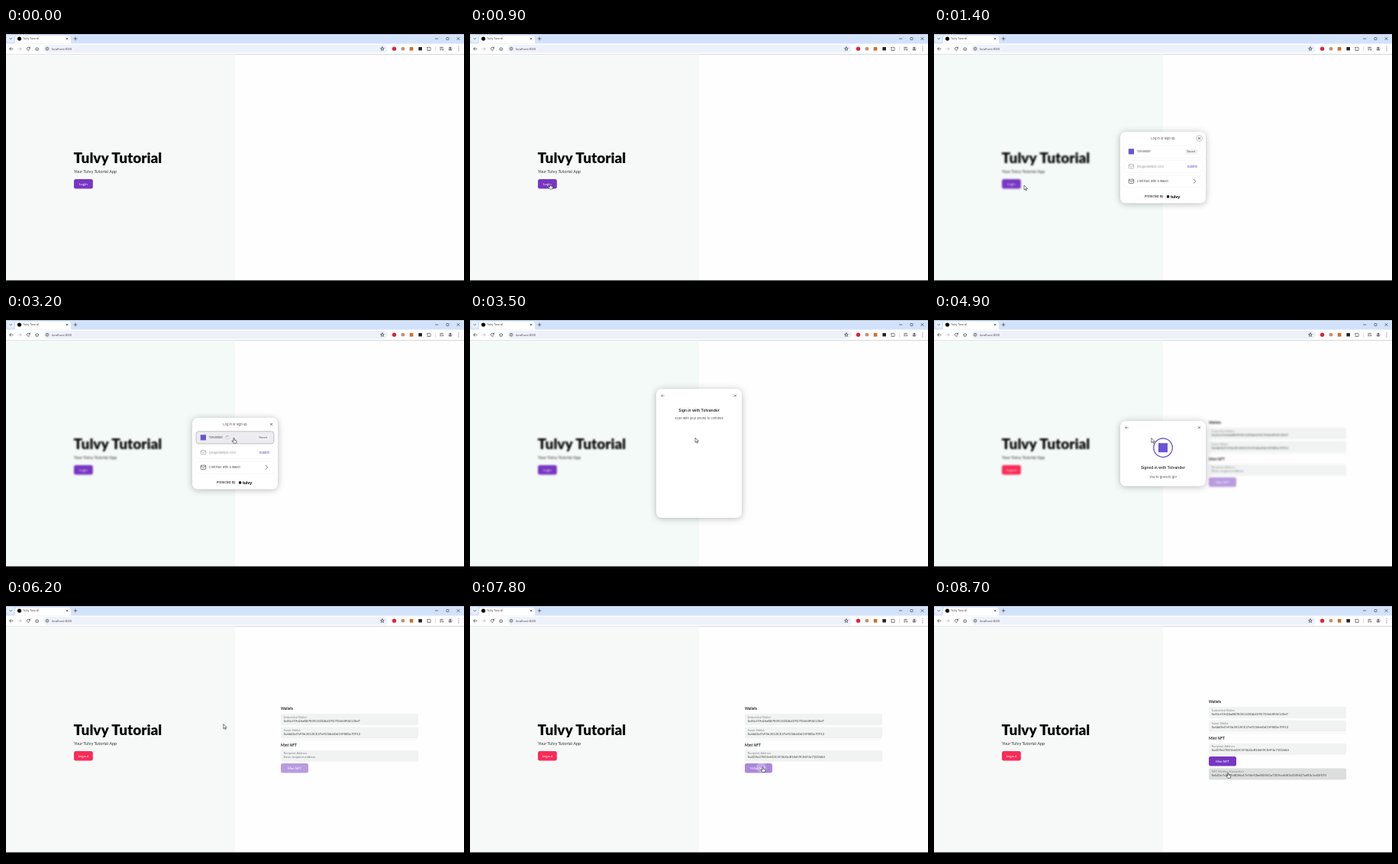
Write an HTML page that moves like this. It is 600x338 px and loops after 8.9 s.

```html
<!DOCTYPE html>
<html lang="en">
<head>
<meta charset="utf-8">
<title>Tulvy Tutorial</title>
<style>
  html, body { margin: 0; width: 100%; height: 100%; overflow: hidden; background: #000; }
  svg { display: block; width: 100vw; height: 100vh; }
  text { white-space: pre; }
  .lato { font-family: Lato, sans-serif; }
  .inter { font-family: Inter, sans-serif; }
  .ui { font-family: "Open Sans", sans-serif; }
  .line { fill: none; stroke: #3c4043; stroke-width: .7; stroke-linecap: round; stroke-linejoin: round; }
  .shadow { filter: drop-shadow(0 1px 4px rgba(20, 25, 40, .3)); }
</style>
</head>
<body>
<svg id="stage" viewBox="0 0 600 338"></svg>
<script>
const LOOP = 8900;
const PURPLE = '#7736c3', VIOLET = '#6b54d2', INK = '#101014';

// ---- drawing helpers ----
const text = (x, y, size, str, { font = 'lato', fill = INK, weight = 400, anchor = 'start', id = '' } = {}) =>
  `<text ${id && `id="${id}"`} class="${font}" x="${x}" y="${y}" font-size="${size}" fill="${fill}" font-weight="${weight}" text-anchor="${anchor}">${str}</text>`;
const rect = (x, y, w, h, r, fill, extra = '') =>
  `<rect x="${x}" y="${y}" width="${w}" height="${h}" rx="${r}" fill="${fill}" ${extra}/>`;
const dot = (x, y, r, fill, extra = '') => `<circle cx="${x}" cy="${y}" r="${r}" fill="${fill}" ${extra}/>`;
const line = (d, extra = '') => `<path class="line" d="${d}" ${extra}/>`;
const group = (id, body, extra = '') => `<g id="${id}" ${extra}>${body}</g>`;
const cross = (x, y, s) => line(`M${x - s} ${y - s}l${2 * s} ${2 * s}m0 ${-2 * s}l${-2 * s} ${2 * s}`);
const spinner = (id, x, y, r, color, width, base) =>
  dot(x, y, r, 'none', `stroke="${base}" stroke-width="${width}"`) +
  `<circle id="${id}" data-c="${x} ${y}" cx="${x}" cy="${y}" r="${r}" fill="none" stroke="${color}" stroke-width="${width}" pathLength="100"/>`;

// ---- browser frame ----
function browser() {
  const dots = [24.7, 27.2, 29.7].map(y => dot(593, y, .55, '#3c4043')).join('');
  return rect(0, 8, 600, 13, 0, '#d3e2fb') +
    rect(1.5, 9.5, 9, 9, 2.5, '#e7effd') + line('M4.8 13.4l1.4 1.4 1.4-1.4') +
    '<path d="M10 20.5q2 0 2-2v-6q0-2.5 2.5-2.5h68q2.5 0 2.5 2.5v6q0 2 2 2z" fill="#fff"/>' +
    dot(17.5, 14, 2.6, '#000') + text(22.3, 15.3, 3.4, 'Tulvy Tutorial', { font: 'ui', fill: '#333' }) +
    cross(80, 14, 1) + line('M89 14h4m-2-2v4') +
    line('M562.5 14h3.4') + rect(577, 12.5, 3, 3, .4, 'none', 'stroke="#333" stroke-width=".6"') + cross(592.5, 14, 1.6) +
    rect(0, 20.5, 600, 14, 0, '#fff') + rect(49, 22, 451, 10.4, 5.2, '#edf1f9') +
    line('M9 27.3H4.8m1.9-2l-2 2 2 2') + line('M15.8 27.3H20m-1.9-2l2 2-2 2', 'opacity=".35"') +
    line('M31 26a2 2 0 1 0 .2 2M31.4 24.9v1.5h-1.5') + line('M38.7 27.2l2-1.9 2 1.9m-3.4-.4v2.4h2.8v-2.4') +
    dot(54, 27.2, 2, 'none', 'stroke="#3c4043" stroke-width=".6"') + line('M54 27v1.2m0-2.2v.1') +
    text(59.8, 28.7, 3.9, 'localhost:3000', { font: 'ui', fill: '#444' }) +
    line('M493 24.8l.7 1.6 1.7.1-1.3 1.1.4 1.7-1.5-.9-1.5.9.4-1.7-1.3-1.1 1.7-.1z') +
    dot(508.6, 27.2, 2.6, '#dc2238') + dot(520, 27.2, 2.4, '#bd917b') + rect(528.8, 25, 4.6, 4.6, 0, '#d56c29') +
    rect(540.4, 25, 4.6, 4.4, 0, '#252528') +
    line('M552 25.6h1.3q.7-1.5 1.4 0h1.3v1.2q1.4.7 0 1.4v1.2h-4v-1.2q1-.7 0-1.4z') +
    line('M562.8 24.5v5.5', 'opacity=".3"') + line('M568.7 25.4h4m-4 1.7h2m-2 1.7h1.4m2-1v1.4m0-1.4h1') +
    dot(582, 27.2, 2.9, '#d2d3d8') + dot(582, 26.2, 1.1, '#5a5b63') + '<path d="M579.8 29a2.3 1.9 0 0 1 4.4 0z" fill="#5a5b63"/>' +
    dots + rect(0, 34.2, 600, .6, 0, '#e6e9ee') +
    rect(0, 0, 600, 8, 0, '#000') + rect(0, 330.6, 600, 8, 0, '#000');
}

// ---- page ----
const button = (x, y, w, fill, label, size, id) =>
  group(id, rect(x, y, w, 12.4, 2.5, fill, 'class="face"') +
    text(x + w / 2, y + 7.8, size, label, { fill: '#fff', anchor: 'middle' }));
const field = (y, label, value, id, fill = '#f1f2f2') =>
  rect(360, y, 180, 15, 2, fill) + text(363.7, y + 5.7, 3.9, label, { fill: '#8a8a8c' }) +
  text(363.7, y + 10.7, 4.15, value, { fill: '#444', id });

const RECIPIENT = '0x4D9a27E81b603C5f7A42eB18d59C06F3a71D2b84';

function page() {
  const dashboard =
    text(360, 144, 4.9, 'Wallets', { weight: 600 }) +
    field(149, 'Embedded Wallet', '0x83cf19d24aBB7E05C6DDA41f92703b58F6E120d7') +
    field(166.4, 'Smart Wallet', '0x6A40d7e95b3812fCE27a9C04b6Dd15F8B3e70912') +
    rect(360, 183.6, 180, .4, 0, '#e7e8e8') +
    text(360, 191.8, 4.9, 'Mint NFT', { weight: 600 }) +
    field(196.7, 'Recipient Address', '', 'recipient') +
    button(360, 214, 36, PURPLE, 'Mint NFT', 4.3, 'mint') +
    group('minting', spinner('mintSpin', 367, 221.2, 1.5, '#fff', .5, 'none') + dot(381.5, 219.5, 6.5, '#fff', 'opacity=".28"')) +
    group('receipt', field(229.6, 'NFT Minting Transaction',
      '0xb41e7c9025d83f6a17c04e92bd58f361a7209ce4d81b35f0627ad94c1e83f570', '', '#dcdede'));
  return rect(0, 34.5, 600, 297, 0, '#fefefe') + rect(0, 34.5, 300, 297, 0, '#f7f9f9', 'id="panel"') +
    group('content',
      text(88.6, 176.6, 19, 'Tulvy Tutorial', { weight: 900, fill: '#060606' }) +
      text(89, 190.2, 5.6, 'Your Tulvy Tutorial App', { fill: '#333' }) +
      button(89, 198, 24.8, PURPLE, 'Login', 4.6, 'login') +
      button(89, 198, 24.8, '#fa2b57', 'Logout', 4.6, 'logout') +
      group('dashboard', dashboard));
}

// ---- dialogs ----
const inter = (x, y, size, str, o = {}) => text(x, y, size, str, { font: 'inter', fill: '#4b4b53', ...o });
const centered = { anchor: 'middle' };
const sheet = (y, h) => rect(244, y, 112, h, 7, '#fff', 'class="shadow"');
const row = (y, id = '') => rect(249, y, 102, 16.2, 3.5, '#fff', `stroke="#f0f0f4" stroke-width=".6" ${id}`);
const envelope = (y, color) => rect(255.2, y - 2.6, 6.5, 5.2, 1, 'none', `stroke="${color}" stroke-width=".7"`) +
  line(`M255.5 ${y - 1.6}l3 2 3-2`, `style="stroke:${color}"`);
const backArrow = y => line(`M254.3 ${y}h-3.6m1.6-1.6l-1.7 1.6 1.7 1.6`, 'style="stroke-width:.5"');

function dialogs() {
  const choose = sheet(136, 93.5) +
    inter(300, 146, 4, 'Log in or sign up', centered) +
    dot(347.5, 144.5, 4, '#f6f6f9', 'id="focus" stroke="#aaa9ba" stroke-width=".6"') + cross(347.5, 144.5, 1.2) +
    row(153.8, 'id="firstRow"') + row(173.2) + row(192.7) +
    rect(254.8, 158.2, 7.2, 7.2, 0, VIOLET) + inter(265.8, 163.3, 3.9, 'Tolvander') +
    group('rowBusy', spinner('rowSpin', 290, 162, 2.3, '#8c8c98', .6, '#d0d0d7')) +
    rect(329, 158.4, 16, 7, 1.8, '#f1f1f4') + inter(337, 163.1, 3.3, 'Recent', centered) +
    envelope(181.3, '#9b9ba6') + inter(265.8, 182.6, 3.9, 'you@example.com', { fill: '#96969f' }) +
    inter(338.3, 182.7, 4, 'Submit', { ...centered, fill: VIOLET, weight: 500 }) +
    envelope(200.8, '#44444c') + inter(265.8, 202.2, 3.95, 'Continue with a wallet') + line('M340.3 198.3l2.4 2.5-2.4 2.5') +
    inter(276, 222.3, 4, 'Protected by', { weight: 500, fill: '#222' }) + dot(306.6, 220.9, 1.8, '#050505') +
    inter(310, 222.5, 5, 'tulvy', { weight: 700, fill: '#000' });
  const scan = sheet(98, 169) + backArrow(107) + cross(347.5, 107, 1.2) +
    inter(300, 128, 5, 'Sign in with Tolvander', { ...centered, weight: 600, fill: '#222' }) +
    inter(300, 137.5, 4, 'Scan with your phone to continue', centered);
  const signing = sheet(140, 85.5) + backArrow(148.8) + cross(347.5, 148.8, 1.2) +
    spinner('ring', 300, 175.2, 12.3, VIOLET, 1.2, '#c9c4f0') + rect(294, 169.2, 12, 12, 0, VIOLET) +
    inter(300, 202.5, 4.9, 'Signing in with Tolvander', { ...centered, weight: 600, fill: '#333', id: 'signTitle' }) +
    inter(300, 215.2, 4.1, 'This should only take a moment', { ...centered, id: 'signNote' });
  return group('choose', choose) + group('scan', scan) + group('signing', signing);
}

const pointer = group('arrow', '<path d="M0 0v6.1l1.5-1.3 1 2.2 1-.5-1-2.1h2z" fill="#fff" stroke="#111" stroke-width=".55"/>') +
  group('hand', '<path d="M-.6 .5q.6-.8 1.2 0v2.4l2.3.6q.8.3.6 1.3l-.5 2.2H-.6l-2-2.6q0-.9.8-.6l1.2.9z" fill="#fff" stroke="#111" stroke-width=".55"/>');

document.getElementById('stage').innerHTML = page() + dialogs() + browser() + group('cursor', pointer);

// ---- motion ----
const el = Object.fromEntries([...document.querySelectorAll('[id]')].map(n => [n.id, n]));
const show = (name, on) => { el[name].style.display = on ? '' : 'none'; };
const clamp = v => Math.min(1, Math.max(0, v));
const ramp = (t, from, length) => clamp((t - from) / length);
const within = (t, a, b) => t >= a && t < b;

// time, x, y
const PATH = [
  [200, 150, 186], [700, 104, 204], [1100, 106, 204], [1400, 118, 206], [1900, 118, 206],
  [2600, 298.6, 162.2], [3400, 298.6, 162.2], [3700, 284.8, 162.4], [6200, 284.8, 162.6],
  [6700, 392, 204], [7000, 392, 204], [7300, 383.5, 218.5], [8000, 383.5, 218.5], [8500, 385.3, 226.3], [8900, 385.3, 226.3]
];

function position(t) {
  const i = Math.max(1, PATH.findIndex(p => p[0] > t));
  const [t0, x0, y0] = PATH[i - 1], [t1, x1, y1] = PATH[i];
  const k = ramp(t, t0, t1 - t0), e = k * k * (3 - 2 * k);
  return [x0 + (x1 - x0) * e, y0 + (y1 - y0) * e];
}

function spin(name, t, period, share) {
  const node = el[name];
  node.setAttribute('stroke-dasharray', `${share} ${100 - share}`);
  node.setAttribute('transform', `rotate(${t / period * 360 % 360} ${node.dataset.c})`);
}

function draw(t) {
  const opening = ramp(t, 900, 300), closing = 1 - ramp(t, 5500, 300);
  const veil = Math.min(opening, closing), signedIn = t >= 4700, paid = t >= 8300;

  el.content.style.filter = veil ? `blur(${.9 * veil}px)` : 'none';
  el.panel.setAttribute('fill', veil ? '#f4faf7' : '#f7f9f9');
  show('login', !signedIn);
  show('logout', signedIn);
  show('dashboard', signedIn);

  show('choose', within(t, 900, 3500));
  show('scan', within(t, 3500, 3700));
  show('signing', within(t, 3700, 5800));
  el.choose.style.opacity = opening;
  el.signing.style.opacity = closing;
  show('focus', t < 1900);
  const over = within(t, 2500, 3500);
  el.firstRow.setAttribute('fill', over ? '#ececf0' : '#fff');
  el.firstRow.setAttribute('stroke', over ? '#9c9ca6' : '#f0f0f4');
  show('rowBusy', within(t, 2900, 3500));
  el.signTitle.textContent = signedIn ? 'Signed in with Tolvander' : 'Signing in with Tolvander';
  el.signNote.textContent = signedIn ? "You're good to go!" : 'This should only take a moment';

  const filled = t >= 6900, minting = within(t, 7400, 8200);
  el.dashboard.setAttribute('transform', `translate(0 ${paid ? -9 : 0})`);
  el.recipient.textContent = filled ? RECIPIENT : 'Enter recipient address';
  el.recipient.setAttribute('fill', filled ? '#444' : '#77777a');
  el.mint.querySelector('.face').setAttribute('fill', minting ? '#aa88dc' : filled ? PURPLE : '#b99cdf');
  show('minting', minting);
  show('receipt', paid);

  spin('ring', t, 1200, signedIn ? 100 : 74);
  spin('rowSpin', t, 900, 28);
  spin('mintSpin', t, 900, 35);

  const hand = within(t, 500, 1100) || over || t >= 7200;
  show('cursor', t >= 200);
  show('hand', hand);
  show('arrow', !hand);
  el.cursor.setAttribute('transform', `translate(${position(Math.max(t, 200))})`);
}

function tick() {
  const t = performance.now() % LOOP;
  draw(Math.min(8700, Math.floor(t / 100) * 100));
  requestAnimationFrame(tick);
}
tick();
</script>
</body>
</html>
```
